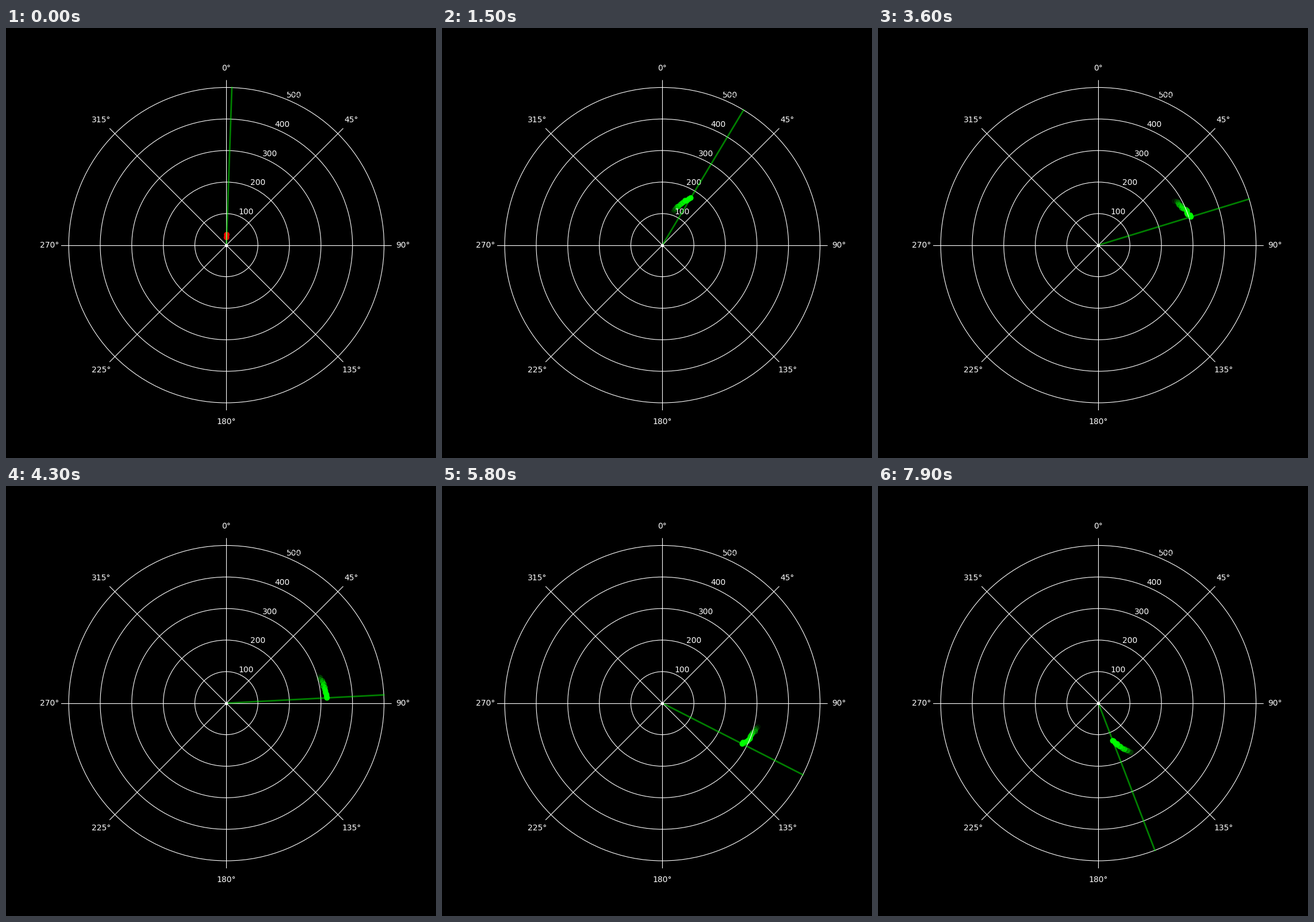
Write a matplotlib script that moves like this. It is 748 px wide and 748 px high and loops after 8 s.

```python
import matplotlib.pyplot as plt
import numpy as np
from matplotlib.animation import FuncAnimation

FRAMES = 80
INTERVAL = 100
MAX_RANGE = 500
TRAIL = 15
ALERT = 50

# One simulated echo per degree of sweep
rng = np.random.default_rng(4)
degrees = np.arange(181)
ranges = 19 + 300 * np.sin(np.radians(degrees)) + rng.uniform(-4, 4, degrees.size)

fig = plt.figure(figsize=(7.48, 7.48), dpi=100, facecolor="black")
ax = fig.add_subplot(projection="polar", facecolor="black")
ax.set_theta_zero_location("N")
ax.set_theta_direction(-1)
ax.set_ylim(0, MAX_RANGE * 1.05)
ax.set_yticks(range(100, MAX_RANGE + 1, 100))
ax.tick_params(colors="white")
ax.grid(color="white")

echoes = ax.scatter([], [])
beam, = ax.plot([], [], color="lime", alpha=0.5, linewidth=2)
ax.plot(0, 0, "wo", markersize=3)


def sweep_angle(frame):
    return max(2, 1 + 2 * frame)


def update(frame):
    angle = sweep_angle(frame)
    beam.set_data(np.radians([angle, angle]), [0, MAX_RANGE])

    recent = np.arange(max(1, angle - TRAIL + 1), angle + 1)
    dist = ranges[recent]
    colors = np.zeros((recent.size, 4))
    colors[:, 0] = dist < ALERT
    colors[:, 1] = dist >= ALERT
    colors[:, 3] = np.linspace(0, 1, TRAIL)[-recent.size:]
    echoes.set_offsets(np.column_stack([np.radians(recent), dist]))
    echoes.set_facecolor(colors)
    echoes.set_edgecolor(colors)
    return echoes, beam


anim = FuncAnimation(fig, update, frames=FRAMES, interval=INTERVAL,
                     repeat=True, repeat_delay=0)
plt.show()
```
